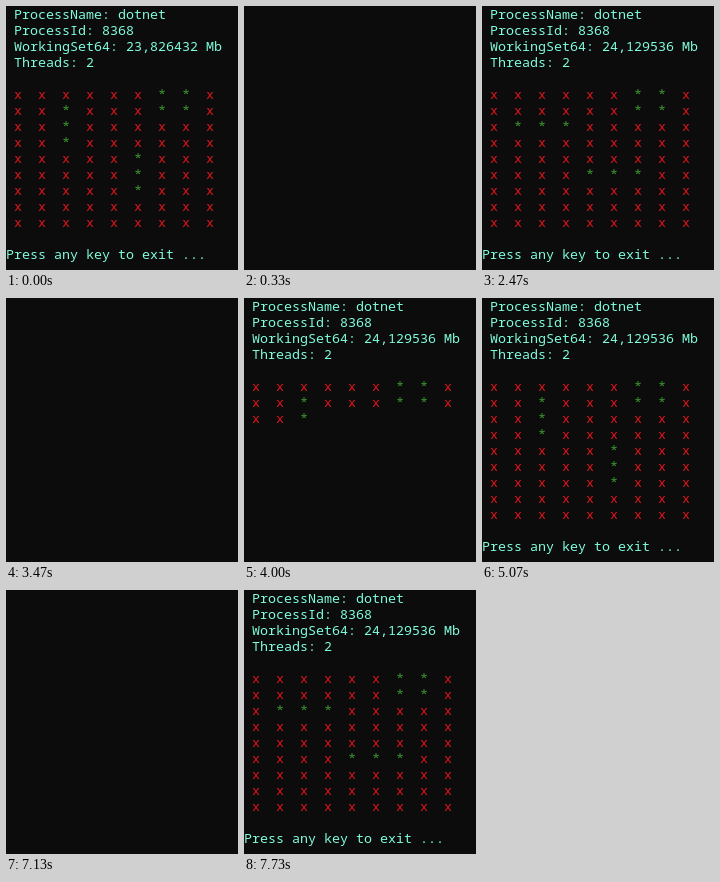
Write an HTML page that moves like this. It is 232x264 px and loops after 8000 ms.

```html
<!DOCTYPE html>
<html lang="en">
<head>
<meta charset="utf-8">
<title>Console Game of Life</title>
<style>
  html, body { margin: 0; width: 100%; height: 100%; overflow: hidden; background: #0c0c0c; }
  svg { display: block; width: 232px; height: 264px; }
  text { font: 13.333px "Noto Sans Mono", "DejaVu Sans Mono", monospace; white-space: pre; fill: #7ffcdc; }
  .dead { fill: #e0141c; }
  .live { fill: #3a9a30; }
</style>
</head>
<body>
<svg id="screen" viewBox="0 0 232 264"></svg>
<script>
const LOOP = 8000, SIZE = 9, CELLS = SIZE * SIZE;
const CHAR = 8, LINE = 16, BASELINE = 13;
const screen = document.getElementById('screen');

function addText(col, row, content) {
  const node = document.createElementNS('http://www.w3.org/2000/svg', 'text');
  node.setAttribute('x', col * CHAR);
  node.setAttribute('y', row * LINE + BASELINE);
  node.textContent = content;
  screen.appendChild(node);
  return node;
}

const header = ['ProcessName: dotnet', 'ProcessId: 8368', '', 'Threads: 2']
  .map((line, row) => addText(1, row, line));
const cells = Array.from({ length: CELLS }, (_, i) =>
  addText(1 + 3 * (i % SIZE), 5 + Math.floor(i / SIZE), 'x'));
const prompt = addText(0, 15, 'Press any key to exit ...');

// Start time of each generation, and redraws caught part way: [start, end, cells printed]
const turns = [400, 870, 1400, 1930, 2470, 3000, 3530, 4000, 4530, 5070, 5600, 6130, 6670, 7200, 7670];
const redraws = [[330, 400, -1], [870, 930, 31], [3470, 3530, -1], [4000, 4070, 21], [7130, 7200, -1], [7670, 7730, 21]];
const blinkers = [[2, 2], [5, 5]];

function isLive(col, row, flat) {
  if ((col === 6 || col === 7) && row < 2) return true;
  return blinkers.some(([x, y]) => flat
    ? row === y && Math.abs(col - x) < 2
    : col === x && Math.abs(row - y) < 2);
}

function show(node, on) {
  node.style.display = on ? '' : 'none';
}

function render(t) {
  const flat = turns.filter(start => t >= start).length % 2 === 1;
  const redraw = redraws.find(([start, end]) => t >= start && t < end);
  const printed = redraw ? redraw[2] : CELLS;
  const memory = t < 870 ? '23,826432' : t < 2470 ? '24,12544' : '24,129536';

  header[2].textContent = `WorkingSet64: ${memory} Mb`;
  header.forEach(node => show(node, printed >= 0));
  cells.forEach((node, i) => {
    const live = isLive(i % SIZE, Math.floor(i / SIZE), flat);
    node.textContent = live ? '*' : 'x';
    node.setAttribute('class', live ? 'live' : 'dead');
    show(node, i < printed);
  });
  show(prompt, printed === CELLS);
}

const begin = performance.now();
function tick() {
  render((performance.now() - begin) % LOOP);
  requestAnimationFrame(tick);
}
tick();
</script>
</body>
</html>
```
